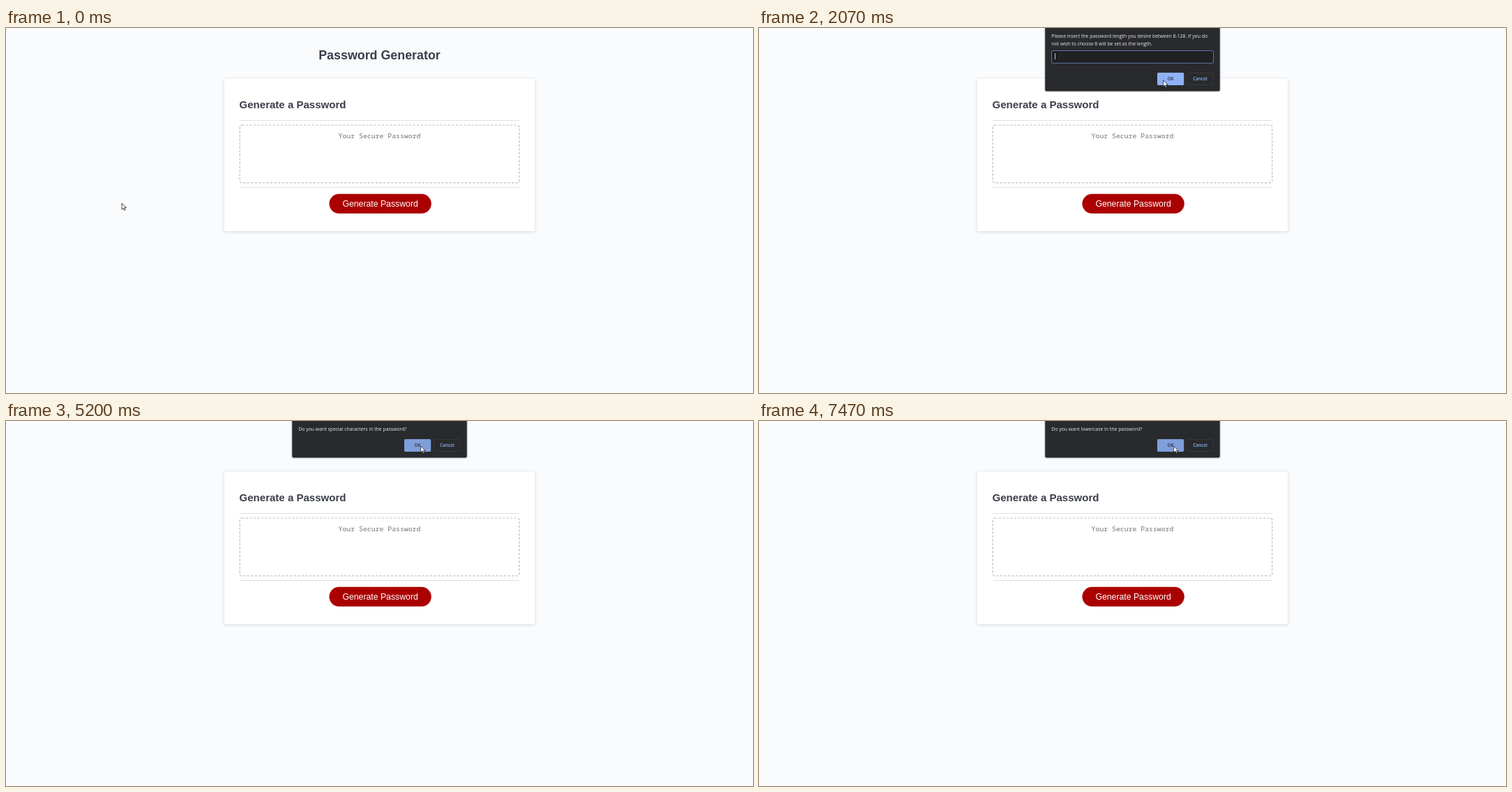
Recreate the animation shown at these times as an HTML page. Size 1071x523 px, loop 8 s.

```html
<!DOCTYPE html>
<html lang="en">
<head>
<meta charset="utf-8">
<title>Password Generator</title>
<style>
  html, body { margin: 0; width: 100%; height: 100%; overflow: hidden; background: #fafbfd; }
  svg { display: block; width: 100%; height: 100%; }
  .sans { font-family: "Liberation Sans", Arial, sans-serif; }
  .heading { font-weight: bold; fill: #3b3e4b; }
  .mono { font: 9.82px "Noto Sans Mono", monospace; fill: #757575; }
  .middle { text-anchor: middle; }
  .card { filter: drop-shadow(0 .6px .7px rgba(60,64,67,.24)) drop-shadow(0 1.1px 2px rgba(60,64,67,.16)); }
  .dialog { font: 6.88px "Open Sans", "Noto Sans", sans-serif; fill: #e8eaed; }
  .panel { fill: #292a2d; filter: drop-shadow(0 .8px 1.2px rgba(0,0,0,.55)); }
  .label { font-size: 6.45px; font-weight: 600; text-anchor: middle; }
  .cursor { fill: #fff; stroke: #111; stroke-width: .75; stroke-linejoin: round; }
</style>
</head>
<body>
<svg viewBox="0 0 1071 523">
  <rect width="1071" height="523" fill="#fafbfd"/>
  <text class="sans heading middle" x="535.5" y="44.7" font-size="17.85">Password Generator</text>

  <rect class="card" x="312.4" y="72.3" width="446.2" height="219.2" rx="2.8" fill="#fff"/>
  <text class="sans heading" x="334.5" y="115" font-size="15.06">Generate a Password</text>
  <path d="M334.7 132.5H736.3M334.7 228.5H736.3" stroke="#e0e0e0"/>
  <rect x="335.2" y="139" width="400.6" height="82.8" rx="2.8" fill="none"
        stroke="#bebebe" stroke-width="1.2" stroke-dasharray="3.35 2.23"/>
  <text class="mono middle" x="535.5" y="158.2">Your Secure Password</text>
  <rect x="463.4" y="237.8" width="146.4" height="28" rx="14" fill="#aa0000"/>
  <text class="sans middle" x="536.6" y="255.8" font-size="12.27" fill="#fff">Generate Password</text>

  <g id="dialogs"></g>
  <path id="arrow" class="cursor" d="M0 0V9.1L2.2 7.1 3.6 10.3 5.1 9.6 3.7 6.6H6.6Z"/>
  <path id="hand" class="cursor" d="M-1.1 8V1a1.1 1.1 0 0 1 2.2 0V4.2l3.2.8q1.1.4 1 1.5v2.4L4.2 12.5H-.8L-3.7 8.2q-.3-1.4 1-1.1Z"/>
</svg>
<script>
const LOOP = 8000, STEP = 1000 / 15, OPEN = 200, CLOSE = 250;
const $ = id => document.getElementById(id);
const clamp = v => Math.max(0, Math.min(1, v));

const confirmText = what => [`Do you want ${what} in the password?`];
const dialogs = [
  { open: 925, close: 3520, height: 90.6, prompt: true,
    lines: ['Please insert the password length you desire between 8-128. If you do',
            'not wish to choose 8 will be set as the length.'] },
  { open: 3890, close: 4850, height: 52.6, lines: confirmText('numbers') },
  { open: 4960, close: 6050, height: 52.6, lines: confirmText('special characters') },
  { open: 6160, close: 7050, height: 52.6, lines: confirmText('uppercase') },
  { open: 7160, close: Infinity, height: 52.6, lines: confirmText('lowercase') }
];

function dialogMarkup({ height, lines, prompt }) {
  const top = height - 26.6;
  const rows = lines.map((line, i) => `<text x="419.3" y="${13.6 + i * 10.9}">${line}</text>`).join('');
  const field = `<rect x="419.5" y="32.5" width="232" height="17.8" rx="1.2" fill="#202124" stroke="#5d74a3"/>
    <text id="value" x="424" y="43.6"></text>
    <rect id="caret" y="36.3" width=".8" height="8.8"/>`;
  return `<g class="dialog">
    <rect class="panel" x="410.3" y="-12" width="250.4" height="${height + 12}" rx="2.2"/>
    ${rows}${prompt ? field : ''}
    <rect x="571" y="${top}" width="38.2" height="17.9" rx="1.6" fill="${prompt ? '#8fb2f6' : '#7f9fda'}"/>
    <text class="label" x="590" y="${top + 11.2}" fill="#2b3242">OK</text>
    <rect x="613.9" y="${top + .4}" width="37.4" height="17.1" rx="1.6" fill="none" stroke="#3a3c41" stroke-width=".8"/>
    <text class="label" x="632.5" y="${top + 11.2}" fill="#8ab4f8">Cancel</text>
  </g>`;
}
$('dialogs').innerHTML = dialogs.map(dialogMarkup).join('');
const dialogNodes = [...$('dialogs').children];

// time, x, y of the pointer's hot spot
const pointerPath = [
  [30, 166, 251], [130, 185, 262], [270, 270, 284], [400, 370, 285], [530, 462, 268], [600, 487, 263],
  [1220, 487, 263], [1400, 495, 240], [1750, 540, 150], [2070, 580, 74], [2200, 584, 64.5],
  [3500, 584, 64.5], [3700, 588, 68], [4000, 590, 70], [4070, 590, 70],
  [4270, 592, 61], [4470, 594, 46], [4660, 594.6, 36]
];

function pointerAt(t) {
  const i = pointerPath.findIndex(key => key[0] > t);
  if (i < 0) return pointerPath.at(-1).slice(1);
  if (i === 0) return pointerPath[0].slice(1);
  const [a, b] = [pointerPath[i - 1], pointerPath[i]];
  const u = (t - a[0]) / (b[0] - a[0]);
  return [1, 2].map(k => a[k] + (b[k] - a[k]) * u);
}

function drawDialog(node, { open, close }, t) {
  const left = 1 - clamp((t - open) / OPEN);
  const gone = clamp((t - close) / CLOSE);
  const visible = left < 1 && gone < 1;
  node.style.display = visible ? '' : 'none';
  if (!visible) return;
  const lift = 15 * left ** 1.5 + 7 * gone;
  const scale = 1 + .001 * (15 * left ** 1.5);
  node.setAttribute('opacity', (1 - left ** 2.7) * (1 - gone));
  node.setAttribute('transform', `translate(${535.5 * (1 - scale)} ${-lift}) scale(${scale})`);
}

function drawField(t) {
  const value = '12'.slice(0, t < 3060 ? 0 : t < 3190 ? 1 : 2);
  const blinkStart = value ? 3190 : 930;
  $('value').textContent = value;
  $('caret').setAttribute('x', 424 + 3.8 * value.length);
  $('caret').style.display = t < 3190 && value || Math.floor((t - blinkStart) / 532) % 2 === 0 ? '' : 'none';
}

function drawPointer(t) {
  const [x, y] = pointerAt(t);
  const pointing = t > 520 && t < 1990 || t > 3650 && t < 4390;
  $('hand').style.display = pointing ? '' : 'none';
  $('arrow').style.display = pointing ? 'none' : '';
  $(pointing ? 'hand' : 'arrow').setAttribute('transform', `translate(${x} ${y})`);
}

function render(now) {
  const t = Math.floor((now % LOOP + 4) / STEP) * STEP;
  dialogs.forEach((dialog, i) => drawDialog(dialogNodes[i], dialog, t));
  drawField(t);
  drawPointer(t);
}

const start = performance.now();
function tick() {
  render(performance.now() - start);
  requestAnimationFrame(tick);
}
tick();
</script>
</body>
</html>
```
